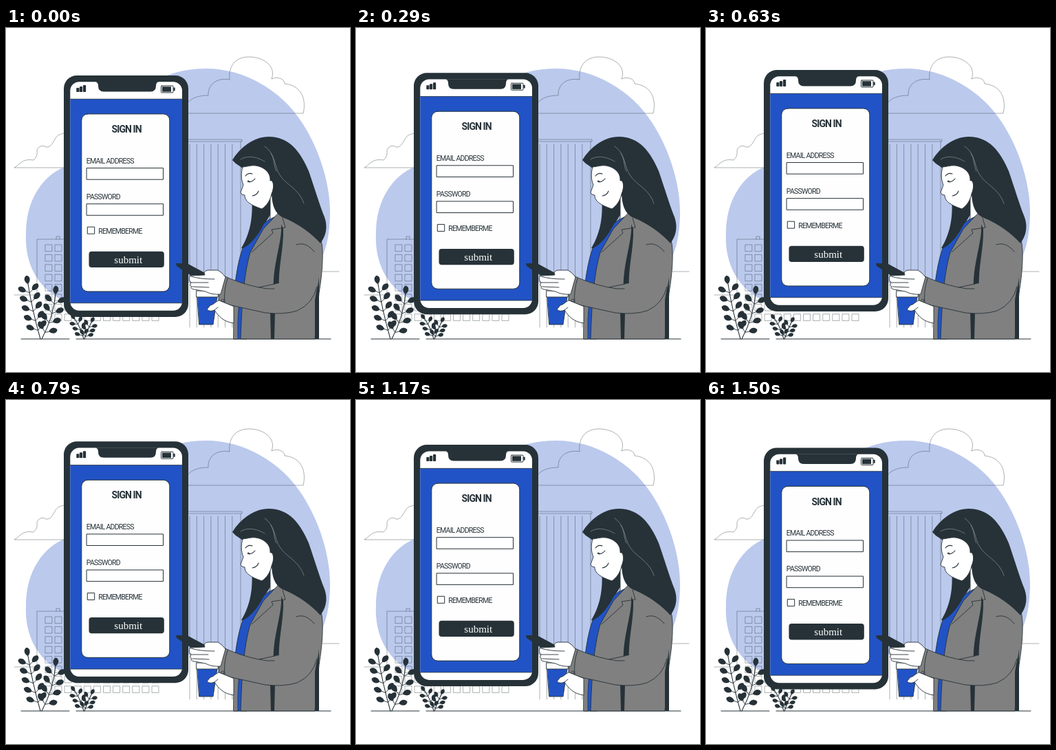
Recreate the animation shown at these times as an HTML page with a canvas. Size 500 by 500 pixels, loop 1540 ms.

```html
<!DOCTYPE html>
<html lang="en">
<head>
<meta charset="utf-8">
<title>Sign in</title>
<style>
html, body { margin: 0; width: 100%; height: 100%; overflow: hidden; background: #fff; }
canvas { display: block; width: 500px; height: 500px; }
</style>
</head>
<body>
<canvas id="stage"></canvas>
<script>
const LOOP = 1540, STEPS = 37, TRAVEL = 9.9;
const INK = '#263238', BLUE = '#2153c6', PALE = '#bbc9ed', GRAY = '#808080', WHITE = '#fff';
const THIN = 'rgba(38,50,56,.55)';

const canvas = document.getElementById('stage');
const ctx = canvas.getContext('2d');
const ratio = window.devicePixelRatio || 1;
canvas.width = canvas.height = 500 * ratio;
ctx.scale(ratio, ratio);
ctx.lineJoin = ctx.lineCap = 'round';

function paint(path, fill, stroke, width = 0.9) {
  if (fill) { ctx.fillStyle = fill; ctx.fill(path); }
  if (stroke) { ctx.strokeStyle = stroke; ctx.lineWidth = width; ctx.stroke(path); }
}
const shape = (d, fill, stroke, width) => paint(new Path2D(d), fill, stroke, width);

function box(x, y, w, h, r, fill, stroke, width) {
  const path = new Path2D();
  path.roundRect(x, y, w, h, r);
  paint(path, fill, stroke, width);
}

function label(text, x, y, size = 10.5, weight = 400, spacing = -0.75) {
  ctx.font = `${weight} ${size}px Roboto, sans-serif`;
  ctx.letterSpacing = spacing + 'px';
  ctx.fillStyle = INK;
  ctx.fillText(text, x, y);
  ctx.letterSpacing = '0px';
}

function leaf(x, y, angle, length, stalk) {
  ctx.save();
  ctx.translate(x, y);
  ctx.rotate(angle);
  shape(`M0 0H${stalk}`, null, INK, 0.8);
  ctx.translate(stalk, 0);
  const l = length, w = length * 0.4;
  shape(`M0 0C${l * .2} ${-w} ${l * .8} ${-w * 1.2} ${l} ${-w * .1}C${l * .9} ${w} ${l * .3} ${w} 0 0Z`, INK);
  ctx.restore();
}

// Stem along a quadratic curve with paired leaves and one at the tip.
function plant(x0, y0, cx, cy, x1, y1, pairs, size) {
  shape(`M${x0} ${y0}Q${cx} ${cy} ${x1} ${y1}`, null, INK, 1.1);
  for (let i = 0; i <= pairs; i++) {
    const u = 0.15 + 0.85 * i / pairs, v = 1 - u;
    const x = v * v * x0 + 2 * u * v * cx + u * u * x1;
    const y = v * v * y0 + 2 * u * v * cy + u * u * y1;
    const dir = Math.atan2(v * (cy - y0) + u * (y1 - cy), v * (cx - x0) + u * (x1 - cx));
    if (i === pairs) leaf(x, y, dir, size, 0);
    else for (const side of [-1, 1]) leaf(x, y, dir + side * 0.95, size, size * 0.45);
  }
}

function drawBackground() {
  shape('M292 59C345 59 400 90 430 137C458 180 472 232 471 272C470 305 465 326 452 347C420 385 330 367 265 370C195 374 140 420 88 398C46 381 27 342 29 299C29 248 55 214 85 202C155 174 165 59 292 59Z', PALE);
  shape('M265 124H432C436 108 433 84 405 81C405 74 395 70 386 74C393 56 375 42 353 42C333 42 323 56 325 75C309 72 293 80 294 98C281 98 270 101 264 109', null, THIN, .7);
  shape('M85 203H12C20 199 23 189 40 192C43 189 46 186 45 178C47 171 54 170 58 173C65 174 67 168 71 162C74 155 80 154 85 153', null, THIN, .7);
  shape('M260 162H343V165H260M341 165V435M460 354H484M12 388H45', null, THIN, .7);
  for (let x = 267; x < 335; x += 10.3) shape(`M${x} 169V435`, null, THIN, .7);
  shape('M45 388V307H90M73 307V303H78V307', null, THIN, .7);
  for (let row = 0; row < 8; row++)
    for (let col = 0; col < 12; col++)
      box(57.3 + col * 14.1, 315 + row * 14.4, 9.6, 9.6, 0, null, THIN, .7);
  shape('M22 452H92M102 452H472', null, INK, 1);
}

function drawPlants() {
  plant(50, 452, 38, 410, 32, 372, 5, 12.5);
  plant(52, 452, 69, 420, 72, 387, 4, 12.5);
  plant(113, 452, 109, 436, 100, 423, 3, 8.5);
  plant(114, 452, 118, 440, 124, 428, 3, 8.5);
}

function drawPhone() {
  box(84, 69, 181, 351, 19, INK);
  box(93.3, 78.3, 162.7, 332.5, 13, WHITE);
  ctx.fillStyle = BLUE;
  ctx.fillRect(93.3, 103.3, 162.7, 296.5);
  shape('M93.3 103.3H256M93.3 399.8H256', null, INK, .8);
  shape('M130 78H222Q218 79 218 84Q218 92.5 210 92.5H142Q134 92.5 134 84Q134 79 130 78Z', INK);
  for (const [x, h] of [[102.3, 6], [107, 8], [112, 10]]) box(x, 93 - h, 4.2, h, .8, INK);
  box(225.5, 84, 17.5, 10, 1, null, INK, 1);
  box(227, 85.3, 13, 7.4, 0, INK);
  box(243.3, 86.6, 2.4, 4.8, .5, INK);

  box(109.8, 125, 128, 258, 9, '#fefefe', INK, 1);
  label('SIGN IN', 153.5, 152.2, 14, 700, -0.9);
  label('EMAIL ADDRESS', 116.8, 197);
  label('PASSWORD', 116.8, 248.6);
  label('REMEMBERME', 134.3, 298.8);
  box(117.5, 203.6, 111, 16.6, 0, WHITE, INK, 1);
  box(117.5, 255.7, 111, 16.6, 0, WHITE, INK, 1);
  box(118.7, 289.2, 10, 10, 0, WHITE, INK, 1);
  box(120.5, 324.7, 109.3, 23.3, 4, INK);
  ctx.font = '15px "Liberation Serif", serif';
  ctx.fillStyle = WHITE;
  ctx.fillText('submit', 157.3, 342);
}

function drawWoman() {
  // hair behind the neck, shirt, jacket
  shape('M357 245C359 270 357 295 342 320C352 322 364 308 374 288L390 262L385 235Z', INK);
  shape('M384 246V276L376 287L396 273L389 240Z', WHITE, INK);
  shape('M375 284Q384 276 398 272L404 285L372 325L350 452H331L332 380Q336 342 344 320Q361 312 375 284Z', BLUE, INK);
  shape('M331 400L339 396Q336 425 337 452H331Z', GRAY, INK, .7);
  shape('M397 268C425 274 452 290 458 308C462 325 460 355 455 385L449 452H341C343 400 345 362 355 326L374 292Z', GRAY, INK);
  shape('M449 395L455 360V452H449Z', INK);
  shape('M402 276L406 290L386 293L388 298L357 326', null, INK);
  shape('M400 285C402 310 387 345 389 380L397 378C395 350 404 320 403 292Z', INK);
  shape('M384 412L391 414L390 452H385Z', INK);

  // hair and face
  shape('M329 192C340 174 360 158 382 158C412 158 428 180 440 208C449 234 455 255 463 275C469 292 463 305 457 313C445 299 424 284 404 276C389 270 386 253 386 236L340 201Q333 197 329 192Z', INK);
  shape('M344 202C341 212 342 221 345 228L341 239Q342 243 347 243C347 251 354 257 372 263C379 258 384 251 386 241C391 230 388 220 384 222C385 210 375 202 363 200C356 199 349 202 344 202Z', WHITE, INK);
  shape('M376 172C391 182 390 200 397 212C407 229 425 232 433 255M385 182C391 192 389 201 393 208M341 191C352 184 366 188 376 194', null, '#8a9296', .7);
  shape('M352 222Q356 226 362 219M348 215Q352 210 358 212M358 244Q365 243 367 237M354 224L351 223', null, INK, 1.1);

  // sleeve
  shape('M448 325C437 312 428 313 422 315', null, INK);
  shape('M316 360Q339 371 367 377L391 372Q410 370 432 345L455 350C456 383 445 403 423 411Q404 417 377 414L309 399Q309 378 316 360Z', GRAY);
  shape('M391 372L367 377Q339 371 316 360Q309 378 309 399L377 414Q404 417 423 411Q446 401 452 376M368 377Q379 380 390 379M322 364Q316 382 318 400', null, INK);
  shape('M317 396A2 2 0 1 1 313 396A2 2 0 1 1 317 396', null, INK, .7);

  // cup and hands
  shape('M278 390H307L301 431H281Z', BLUE, INK);
  shape('M277 382H309L308 391H277Z', WHITE, INK);
  shape('M309 396C303 399 302 402 297 403L292 409Q296 413 303 410C309 419 316 427 331 429V405Z', WHITE, INK);
  shape('M303 410L308 406', null, INK);
  shape('M247 342H263L291 357L287 361L269 360L248 346Z', INK);
  shape('M268 360L289 359Q286 354 293 352H308Q314 355 319 362L312 387Q299 388 290 383L274 380Q267 379 270 376Q266 374 269 370Q264 365 268 360Z', WHITE, INK);
  shape('M269 361Q281 365 303 365M269 370L294 370M271 376L295 377', null, INK);
}

// Steady rise and fall in equal steps, lowest just before the loop restarts.
function phoneOffset(time) {
  const step = Math.floor((time % LOOP + 5) / LOOP * STEPS);
  const phase = (step + 0.9) / STEPS % 1;
  return 0.45 - TRAVEL * (1 - Math.abs(1 - 2 * phase));
}

function draw(time) {
  ctx.fillStyle = WHITE;
  ctx.fillRect(0, 0, 500, 500);
  drawBackground();
  ctx.save();
  ctx.translate(0, phoneOffset(time));
  drawPhone();
  ctx.restore();
  drawPlants();
  drawWoman();
}

let start;
function tick(now) {
  start ??= now;
  draw(now - start);
  requestAnimationFrame(tick);
}
draw(0);
requestAnimationFrame(tick);
</script>
</body>
</html>
```
